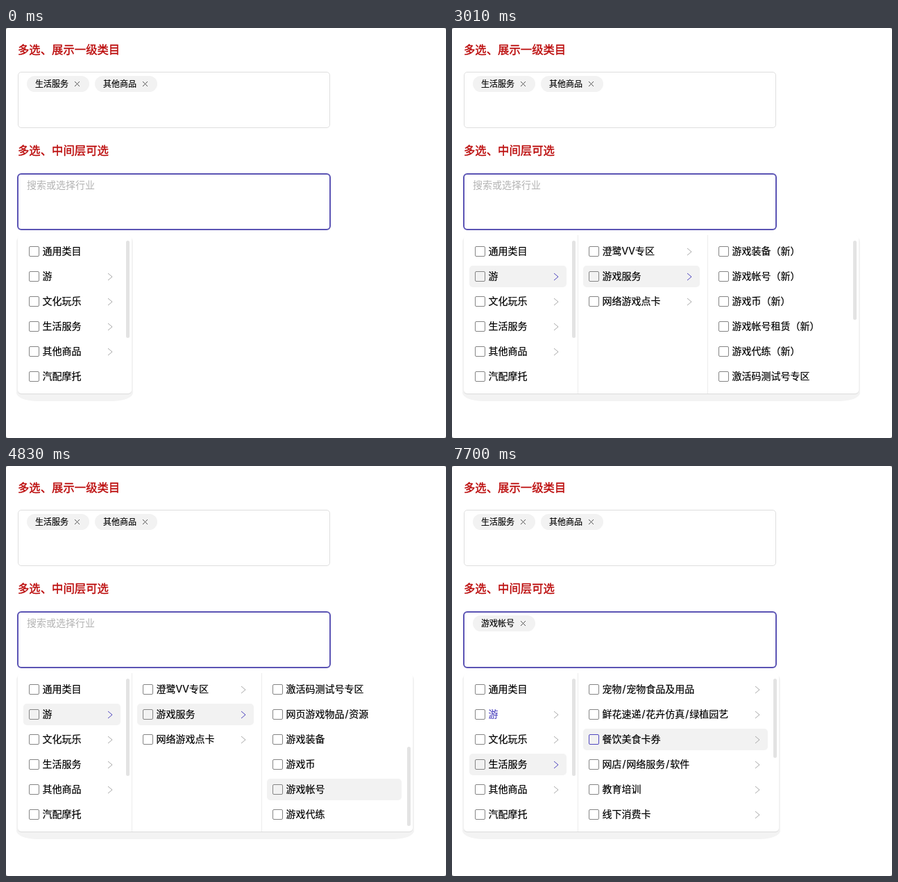
An HTML page that plays this animation: 634 px wide and 590 px high, repeating every 8 s.

```html
<!DOCTYPE html>
<html lang="zh-CN">
<head>
<meta charset="utf-8">
<title>级联选择</title>
<style>
  :root { --accent: #5148c0; --soft: #f2f2f2; }
  html, body { margin: 0; width: 100%; height: 100%; overflow: hidden; }
  html { background: #888; }
  body {
    position: relative; background: #fff; border-radius: 3px; color: #000;
    font: 14px/31px Inter, "Noto Sans CJK SC", "Noto Sans CJK", sans-serif;
    white-space: nowrap;
  }
  body *, .check::after { position: absolute; box-sizing: border-box; }
  h3 {
    margin: 0; left: 17px; font-size: 16.38px; line-height: 24px; font-weight: 400;
    color: #bb0a0a; -webkit-text-stroke: .4px;
  }
  .field { left: 17px; top: 63px; width: 450px; height: 81px; border: 1px solid #dedede; border-radius: 5px; }
  .field.focus { left: 16px; top: 209px; width: 452px; height: 82px; border: 2px solid #5b54b4; border-radius: 6px; }
  .hint { left: 30px; top: 210px; color: #b3b3b3; }
  .caret { left: 30px; top: 218px; width: 1px; height: 17px; background: #222; }
  .tag { width: 90px; height: 23px; border-radius: 12px; background: var(--soft); font-size: 12px; line-height: 23px; }
  .tag span { left: 12px; -webkit-text-stroke: .15px; }
  .tag svg { left: 68.5px; top: 8px; }
  svg { fill: none; stroke: #555; stroke-width: 1; overflow: visible; }
  .shade { left: 15px; top: 300px; height: 237px; background: #f3f3f3; border-radius: 8px 8px 30px 30px / 8px 8px 12px 12px; }
  .panel {
    left: 17px; top: 298px; height: 228px; overflow: hidden; background: #fff;
    border-radius: 5px; box-shadow: 0 1px 1px rgba(0, 0, 0, .1);
  }
  .column { top: 0; height: 228px; overflow: hidden; }
  .column + .column { box-shadow: inset 1px 0 #ececec; }
  .row { height: 31px; border-radius: 5px; }
  .row.lit { background: var(--soft); }
  .row svg { right: 12px; top: 10.5px; stroke: #aaa; }
  .row.open svg { stroke: var(--accent); }
  .row.path .label, .row.picked .label { color: var(--accent); }
  .label { left: 27.5px; top: -1px; -webkit-text-stroke: .2px; }
  .row.picked .label { -webkit-text-stroke: .5px; }
  .label i { position: static; font-style: normal; margin: 0 .9px; }
  .check { left: 8px; top: 8px; width: 15px; height: 15px; border: 1px solid #858585; border-radius: 2px; background: #fff; }
  .lit .check { background: transparent; }
  .check.edge { border-color: var(--accent); }
  .row.picked .check { background: #5148d9; border-color: #5148d9; }
  .row.picked .check::after {
    content: ""; left: 3px; top: 3px; width: 7px; height: 4.5px;
    border: solid #fff; border-width: 0 0 1.3px 1.3px; transform: rotate(-45deg);
  }
  .thumb { width: 5px; border-radius: 3px; background: #e3e3e3; }
</style>
</head>
<body>
<h3 style="top:19px">多选、展示一级类目</h3>
<div class="field"></div>
<h3 style="top:164px">多选、中间层可选</h3>
<div class="field focus"></div>
<div id="tags"></div>
<div id="menu"></div>
<script>
const LOOP = 8000, PITCH = 36;
const PICK_TIME = 5390, SCROLL_TIME = 3990, SCROLL_STEP = 70;
const SCROLL = [0.4, 0.7, 1, 50, 140, 180];

// A trailing ">" marks an entry that has children.
const ROOT = ['通用类目', '游>', '文化玩乐>', '生活服务>', '其他商品>', '汽配摩托'];
const CHILDREN = {
  1: ['澄鹭VV专区>', '游戏服务>', '网络游戏点卡>'],
  2: ['模玩/动漫/周边/cos/桌游>', '文玩/邮币/字画/收藏>', '书籍/杂志/报纸>',
      '音乐/影视/明星/音像>', '特价酒店/特色客栈/公寓旅馆>', '乐器/吉他/钢琴/配件>'],
  3: ['宠物/宠物食品及用品>', '鲜花速递/花卉仿真/绿植园艺>', '餐饮美食卡券>',
      '网店/网络服务/软件>', '教育培训>', '线下消费卡>']
};
const LEAVES = ['游戏装备（新）', '游戏帐号（新）', '游戏币（新）', '游戏帐号租赁（新）', '游戏代练（新）',
  '激活码测试号专区', '网页游戏物品/资源', '游戏装备', '游戏币', '游戏帐号', '游戏代练'];

const OPEN_ROOT = [[0, -1], [1540, 2], [2310, 1], [7140, 3]];
const OPEN_CHILD = [[0, -1], [3010, 1], [7140, -1]];
const HOVER = [[0, ''], [1190, '0-2'], [1890, '0-1'], [2730, '1-1'], [3290, '2-3'], [3710, '2-4'],
  [4830, '2-9'], [6090, ''], [6510, '0-2'], [6790, '0-3'], [7420, '1-3'], [7560, '1-2']];

const valueAt = (track, t) => track.filter(([start]) => start <= t).pop()[1];
const classes = (base, flags) => [base, ...Object.keys(flags).filter(k => flags[k])].join(' ');

const CHEVRON = '<svg width="6" height="10"><path d="M0 0L6 5L0 10"/></svg>';
const CROSS = '<svg width="7" height="7"><path d="M0 0L7 7M7 0L0 7"/></svg>';
const tag = (x, y, text) =>
  `<div class="tag" style="left:${x}px;top:${y}px"><span>${text}</span>${CROSS}</div>`;

function row(entry, i, { level, width, open, path, picked, hover, edge, scroll = 0 }) {
  const parent = entry.endsWith('>');
  const label = entry.replace('>', '').replace(/\//g, '<i>/</i>');
  const hovered = hover === `${level}-${i}`;
  const name = classes('row', {
    lit: hovered || i === open, open: i === open, path: i === path, picked: i === picked
  });
  return `<div class="${name}" style="left:8px;top:${8 + i * PITCH - scroll}px;width:${width}px">` +
    `<div class="${classes('check', { edge: hovered && edge })}"></div>` +
    `<span class="label">${label}</span>${parent ? CHEVRON : ''}</div>`;
}

function column(entries, options) {
  const { x, width, thumb, thumbTop = 8 } = options;
  const bar = thumb
    ? `<div class="thumb" style="left:${width + 16}px;top:${thumbTop}px;height:${thumb}px"></div>` : '';
  return `<div class="column" style="left:${x}px;width:${width + 24}px">` +
    entries.map((entry, i) => row(entry, i, options)).join('') + bar + '</div>';
}

function menu(t) {
  const root = valueAt(OPEN_ROOT, t), child = valueAt(OPEN_CHILD, t);
  const done = t >= PICK_TIME;
  const shared = { hover: valueAt(HOVER, t), edge: t >= 7630 };
  let width = 164;
  let html = column(ROOT, { ...shared, level: 0, x: 0, width: 140, thumb: 140, open: root, path: done ? 1 : -1 });
  if (root > 0) {
    const narrow = root === 1;
    width = narrow ? 352 : 454;
    html += column(CHILDREN[root], {
      ...shared, level: 1, x: 164, width: narrow ? 168 : 266,
      thumb: { 1: 0, 2: 158, 3: 114 }[root], open: child, path: done && narrow ? 1 : -1
    });
  }
  if (child > 0) {
    width = 569;
    const step = Math.min(Math.floor((t - SCROLL_TIME) / SCROLL_STEP), SCROLL.length - 1);
    const scroll = step < 0 ? 0 : SCROLL[step];
    html += column(LEAVES, {
      ...shared, level: 2, x: 351, width: 194, thumb: 114,
      thumbTop: 8 + scroll * 98 / 180, scroll, picked: done ? 9 : -1
    });
  }
  return `<div class="shade" style="width:${width + 4}px"></div>` +
    `<div class="panel" style="width:${width}px">${html}</div>`;
}

function tags(t) {
  const caret = t >= 700 && t < 1190 ? '<div class="caret"></div>' : '';
  return tag(30, 69, '生活服务') + tag(128, 69, '其他商品') +
    (t >= PICK_TIME ? tag(30, 215, '游戏帐号') : `<span class="hint">搜索或选择行业</span>${caret}`);
}

const shown = {};
function show(id, html) {
  if (shown[id] === html) return;
  document.getElementById(id).innerHTML = shown[id] = html;
}

const begin = performance.now();
function draw() {
  const t = (performance.now() - begin) % LOOP;
  show('tags', tags(t));
  show('menu', menu(t));
  requestAnimationFrame(draw);
}
draw();
</script>
</body>
</html>
```
